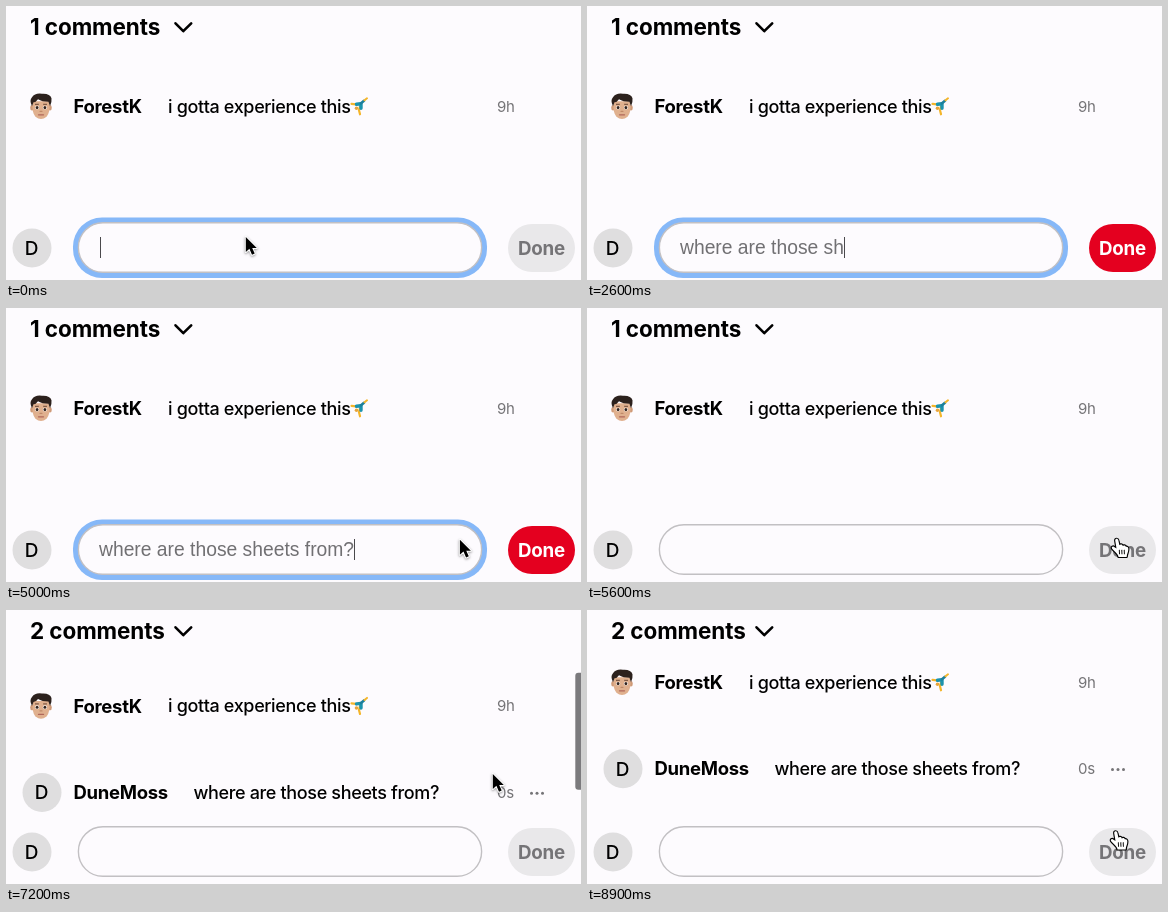
Recreate the animation shown at these times as an HTML page with a canvas. Size 575 by 274 pixels, loop 9000 ms.

```html
<!DOCTYPE html>
<html lang="en">
<head>
<meta charset="utf-8">
<title>Comment box</title>
<style>
html, body { margin: 0; width: 100%; height: 100%; overflow: hidden; background: #fdfbfe; }
canvas { display: block; width: 575px; height: 274px; }
</style>
</head>
<body>
<canvas id="stage"></canvas>
<script>
const W = 575, H = 274, LOOP = 9000, STEP = 100;
const INTER = 'Inter, "Open Sans", sans-serif';
const ARIAL = '"Liberation Sans", Arial, sans-serif';
const MESSAGE = 'where are those sheets from?';
const BG = '#fdfbfe', INK = '#000', GREY = '#757477';

const canvas = document.getElementById('stage');
const ctx = canvas.getContext('2d');
const dpr = window.devicePixelRatio || 1;
canvas.width = W * dpr;
canvas.height = H * dpr;

const clamp = (v) => Math.min(1, Math.max(0, v));
const progress = (t, from, to) => clamp((t - from) / (to - from));
const smooth = (u) => u * u * (3 - 2 * u);
const mix = (a, b, u) => a + (b - a) * u;

function text(str, x, y, font, color = INK, spacing = 0, align = 'left') {
  ctx.font = font;
  ctx.letterSpacing = spacing + 'px';
  ctx.textAlign = align;
  ctx.fillStyle = color;
  ctx.fillText(str, x, y);
}

function paint(fill, stroke, lineWidth = 1) {
  if (fill) { ctx.fillStyle = fill; ctx.fill(); }
  if (stroke) { ctx.strokeStyle = stroke; ctx.lineWidth = lineWidth; ctx.stroke(); }
}

function pill(x, y, w, h, r, fill, stroke, lineWidth) {
  ctx.beginPath();
  ctx.roundRect(x, y, w, h, r);
  paint(fill, stroke, lineWidth);
}

function oval(x, y, rx, ry, fill) {
  ctx.beginPath();
  ctx.ellipse(x, y, rx, ry, 0, 0, Math.PI * 2);
  paint(fill);
}

function line(points, color, width) {
  ctx.beginPath();
  points.forEach(([x, y]) => ctx.lineTo(x, y));
  paint(null, color, width);
}

function path(d, fill, stroke, width) {
  const p = new Path2D(d);
  if (stroke) { ctx.strokeStyle = stroke; ctx.lineWidth = width; ctx.stroke(p); }
  if (fill) { ctx.fillStyle = fill; ctx.fill(p); }
}

function at(x, y, draw) {
  ctx.save();
  ctx.translate(x, y);
  draw();
  ctx.restore();
}

function face() {
  for (const s of [-1, 1]) oval(s * 9, 1.5, 1.8, 2.8, '#cf9a78');
  path('M-8.5-5Q-9.5 6-5.5 10.5Q0 15 5.5 10.5Q9.5 6 8.5-5Z', '#e0b08e');
  path('M-9 0Q-12-6-9-9Q-6-13.5 1-12.5Q9-13 10.5-8Q11-4 9 0L7.5-4.5Q1-4.5-3-7Q-5-4-7.5-4Z', '#2c211d');
  for (const s of [-1, 1]) {
    line([[s * 2.4, -2], [s * 5.6, -2]], '#6b4836', 1);
    oval(s * 3.9, 1.3, 2, 1.9, '#fff');
    oval(s * 3.9, 1.3, 1.4, 1.6, '#33231d');
  }
  line([[-1, 5], [1, 5]], '#c08a69', 1.2);
  line([[-2.5, 8.5], [2.5, 8.5]], '#b0675a', 1.3);
}

function cartwheel() {
  line([[-7.5, -2.5], [-3, -2]], '#f4b52a', 2.2);
  line([[1, 0], [0, 4], [1, 8]], '#f4b52a', 2.2);
  line([[-2.5, -2], [2, -2.5], [2, 2]], '#1c93ad', 3.4);
  line([[2, -3], [5, -5.5]], '#1c7f9b', 2.6);
  line([[5.5, -6], [8, -8]], '#f4b52a', 2);
  oval(-2.5, 2, 1.8, 1.8, '#e9a53a');
}

function badge(x, y, r) {
  oval(x, y, r, r, '#dfdedf');
  text('D', x - 0.3, y + 6.8, '450 19px ' + INTER, INK, 0, 'center');
}

function comment(y, name, body, bodyX, age) {
  text(name, 67.5, y + 6.6, '700 18.5px ' + INTER, INK, -0.3);
  text(body, bodyX, y + 6.5, '450 18px ' + INTER, INK, -0.35);
  text(age, 491, y + 5.3, '400 15px ' + INTER, GREY, -0.2);
}

function header(count) {
  text(count + ' comments', 24, 29.2, '700 22.5px ' + INTER, INK, -0.1);
  line([[169.5, 17.3], [177.3, 25.2], [185.2, 17.3]], INK, 2.6);
}

function footer(typed, focused) {
  badge(26, 242, 19.5);
  if (focused) pill(67, 211.5, 414, 60.5, 29, '#86b8f8');
  pill(72.4, 216.8, 403.2, 49.5, 24.5, BG, '#c2c0c3', 1.4);
  text(typed, 93, 248, '400 19.3px ' + ARIAL, '#717073');
  if (focused) {
    const x = typed ? 93 + ctx.measureText(typed).width : 94;
    ctx.fillStyle = '#4a494c';
    ctx.fillRect(Math.round(x), 231, 1, 21);
  }
  const live = typed.length > 0;
  pill(502, 218, 67, 48, 24, live ? '#e4001f' : '#e9e8ea');
  text('Done', 535.5, 248.6, '700 18.8px ' + INTER, live ? '#fff' : GREY, -0.2, 'center');
}

function scrollbar(scroll, alpha) {
  ctx.globalAlpha = alpha;
  pill(569.3, 59 + scroll * 0.86, 8, 117, 3, '#7b7a7d');
  ctx.globalAlpha = 1;
}

function arrow() {
  ctx.save();
  ctx.shadowColor = 'rgba(0, 0, 0, 0.4)';
  ctx.shadowBlur = 2.5;
  ctx.shadowOffsetY = 1;
  const shape = 'M.8 1V16L4.4 12.8L7 18.8L9.7 17.6L7.2 11.9H11.8Z';
  path(shape, null, '#fff', 2);
  ctx.restore();
  path(shape, '#000');
}

function hand() {
  ctx.scale(0.94, 0.96);
  path('M.2 1.6C.2-.8 3.2-.8 3.6 1.6L4.7 6.6C5.5 5.2 7.9 5.5 8.2 7.2C9.3 6.2 11.1 6.6 11.5 8.1' +
    'C13 7.6 14.2 8.5 14.2 10.4C14.2 14 12.6 15 12.4 18.7H3.8C3.3 15.5-.5 13.2-3 10.2' +
    'C-4.3 8.4-2.2 7.1-.5 8.5L1.6 10Z', '#fff', '#000', 2.4);
  for (let i = 0; i < 3; i++) line([[4.6 + i * 2.6, 11.5], [4.8 + i * 2.6, 15.5]], '#000', 1);
}

// Pointer stops: [start, end, x, y], gliding from the stop before
const MOVES = [[0, 0, 239, 230], [4400, 5300, 528, 231], [6300, 7100, 486, 163], [8000, 8800, 527, 221.5]];

function pointer(t) {
  let x = 0, y = 0;
  for (const [from, to, px, py] of MOVES) {
    const u = to ? smooth(progress(t, from, to)) : 1;
    x = mix(x, px, u);
    y = mix(y, py, u);
  }
  at(x, y, x > 502 && y > 214 ? hand : arrow);
}

function typedCount(t) {
  if (t < 400 || t >= 5500) return 0;
  const n = t <= 1600 ? 1 + (t - 400) / 120 : 11 + (t - 1600) / 140;
  return Math.floor(n + 0.01);
}

function draw(t) {
  ctx.setTransform(dpr, 0, 0, dpr, 0, 0);
  ctx.lineCap = ctx.lineJoin = 'round';
  ctx.fillStyle = BG;
  ctx.fillRect(0, 0, W, H);

  const posted = t >= 5900;
  const scroll = 28 * smooth(progress(t, 7100, 7500));
  const top = 100.3 - scroll;

  header(posted ? 2 : 1);
  at(35, top, face);
  comment(top, 'ForestK', 'i gotta experience this', 162, '9h');
  at(353, top, cartwheel);
  if (posted) {
    const y = top + 86.5;
    badge(36, y, 19.5);
    comment(y, 'DuneMoss', MESSAGE, 187.5, '0s');
    for (let i = 0; i < 3; i++) oval(525.5 + i * 5.5, y + 0.7, 1.5, 1.5, GREY);
  }
  footer(MESSAGE.slice(0, typedCount(t)), t < 5500);
  if (t > 7100) scrollbar(scroll, 1 - progress(t, 8000, 8400));
  if (t < 400 || t >= 4400) pointer(t);
}

const start = performance.now();
function frame() {
  const t = (performance.now() - start) % LOOP;
  draw(Math.floor(t / STEP) * STEP);
  requestAnimationFrame(frame);
}
frame();
</script>
</body>
</html>
```
